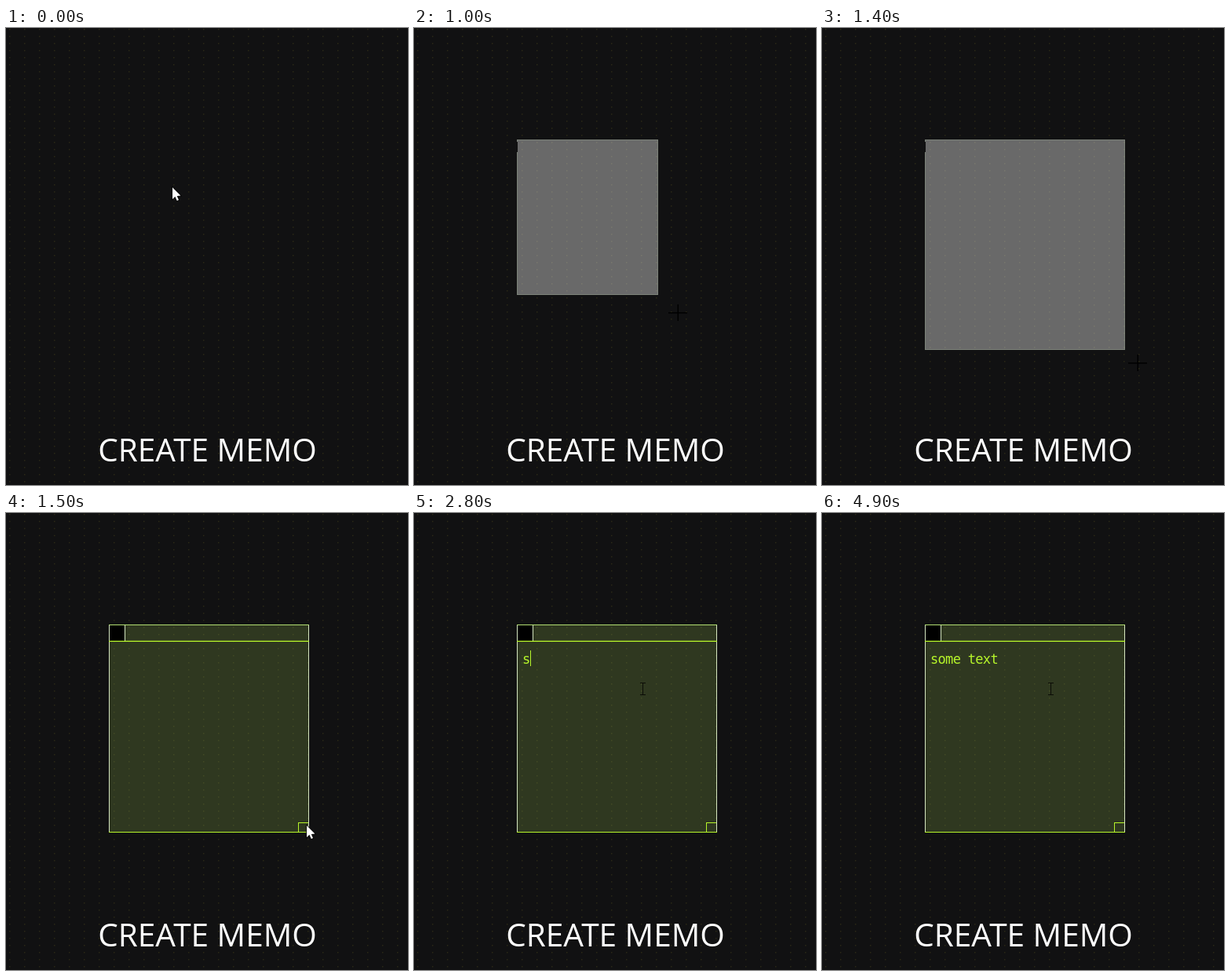
An HTML page with a canvas that plays this animation: 512 by 582 pixels, repeating every 5000 ms.

```html
<!DOCTYPE html>
<html lang="en">
<head>
<meta charset="utf-8">
<title>Create memo</title>
<style>
  html, body { margin: 0; width: 100%; height: 100%; overflow: hidden; background: #111112; }
  canvas { display: block; }
</style>
</head>
<body>
<canvas id="stage" width="512" height="582"></canvas>
<script>
const ctx = document.getElementById('stage').getContext('2d');
const LOOP = 5000, STEP = 100;
const LIME = '#b6f52a', PALE = '#d5e6c0';
const LEFT = 131, TOP = 142, RIGHT = 385, BOTTOM = 406;
const ADVANCE = 9.55;

// Pointer poses: start time, shape, x, y
const pointer = [
  [0, arrow, 212, 203], [100, arrow, 190, 187], [200, arrow, 150, 158], [300, arrow, 131, 144],
  [600, cross, 142, 148], [700, cross, 170, 176], [800, cross, 220, 232], [900, cross, 284, 307],
  [1000, cross, 336, 362], [1100, cross, 372, 387], [1200, cross, 390, 422], [1300, cross, 399, 440],
  [1400, cross, 402, 426], [1500, arrow, 383, 398], [1600, arrow, 374, 389], [1700, beam, 364, 374],
  [1800, beam, 330, 318], [1900, beam, 303, 258], [2000, beam, 293, 230], [2100, beam, 291, 224]
];

// Dragged corner: start time, x, y
const drag = [
  [700, 148, 158], [800, 188, 202], [900, 248, 272], [1000, 311, 340],
  [1100, 350, 371], [1200, 374, 402], [1300, 385, 422], [1400, 386, 410]
];

// Typed text: start time, content
const typing = [
  [0, ''], [2800, 's'], [3000, 'so'], [3200, 'som'], [3400, 'some'], [3600, 'some '],
  [3800, 'some te'], [4000, 'some tex'], [4200, 'some text']
];

const latest = (keys, t) => keys.filter(k => k[0] <= t).pop();

function box(color, x, y, w, h) {
  ctx.fillStyle = color;
  ctx.fillRect(x, y, w, h);
}

function arrow(x, y) {
  const points = [[0, 0], [0, 15], [3.4, 11.8], [5.8, 17], [8, 16], [5.8, 11], [10.5, 10.6]];
  ctx.beginPath();
  points.forEach(([dx, dy]) => ctx.lineTo(x + dx, y + dy));
  ctx.closePath();
  ctx.strokeStyle = '#000';
  ctx.lineWidth = 1.5;
  ctx.stroke();
  ctx.fillStyle = '#fff';
  ctx.fill();
}

function cross(x, y) {
  box('#000', x - 12, y, 24, 1.5);
  box('#000', x - 0.5, y - 10, 1.5, 21);
}

function beam(x, y) {
  box('#0a0c06', x, y - 7, 1, 15);
  box('#0a0c06', x - 3, y - 8, 7, 1);
  box('#0a0c06', x - 3, y + 7, 7, 1);
}

function background() {
  box('#111112', 0, 0, 512, 582);
  for (let x = 4; x < 512; x += 19)
    for (let y = 1; y < 582; y += 9) box('#2b2916', x, y, 1.5, 1.5);
  ctx.font = '40.5px "Open Sans", sans-serif';
  ctx.textAlign = 'center';
  ctx.fillStyle = '#fff';
  ctx.fillText('CREATE MEMO', 256.5, 552);
}

function selection(t) {
  const corner = latest(drag, t);
  if (!corner) return;
  const w = corner[1] - LEFT, h = corner[2] - TOP;
  box('rgba(255,255,255,.37)', LEFT, TOP, w, h);
  ctx.strokeStyle = 'rgba(170,190,160,.3)';
  ctx.lineWidth = 1;
  ctx.strokeRect(LEFT + 0.5, TOP + 0.5, w - 1, h - 1);
  box('#111', LEFT, TOP + 3, 1, 13);
}

function memo(t) {
  box('rgba(167,207,92,.2)', LEFT, TOP, RIGHT - LEFT, BOTTOM - TOP);
  box('#000', LEFT + 1, TOP + 1, 19, 20);
  box(PALE, LEFT + 20, TOP + 1, 1, 20);
  box(PALE, LEFT, TOP, 1, BOTTOM - TOP);
  box(PALE, RIGHT, TOP, 1, BOTTOM - TOP);
  box('#b2df70', LEFT, TOP, RIGHT - LEFT + 1, 1);
  box(LIME, LEFT, TOP + 20.7, RIGHT - LEFT + 1, 1.3);
  box(LIME, LEFT, BOTTOM, RIGHT - LEFT + 1, 1);
  box(LIME, 372, 394, 13, 1);
  box(LIME, 372, 394, 1, 12);

  const text = latest(typing, t)[1];
  ctx.font = '17px "DejaVu Sans Mono", monospace';
  ctx.textAlign = 'left';
  ctx.fillStyle = LIME;
  [...text].forEach((c, i) => ctx.fillText(c, 138 + i * ADVANCE, 192));
  const caretOn = (t >= 1900 && t < 2400) || (t >= 2800 && t < 4800);
  if (caretOn) box(LIME, Math.round(138.7 + text.length * ADVANCE), 175, 1, 20);
}

function frame(now) {
  const t = Math.floor(now % LOOP / STEP) * STEP;
  background();
  if (t < 1500) selection(t);
  else memo(t);
  const [, shape, x, y] = latest(pointer, t);
  shape(x, y);
  requestAnimationFrame(frame);
}
requestAnimationFrame(frame);
</script>
</body>
</html>
```
